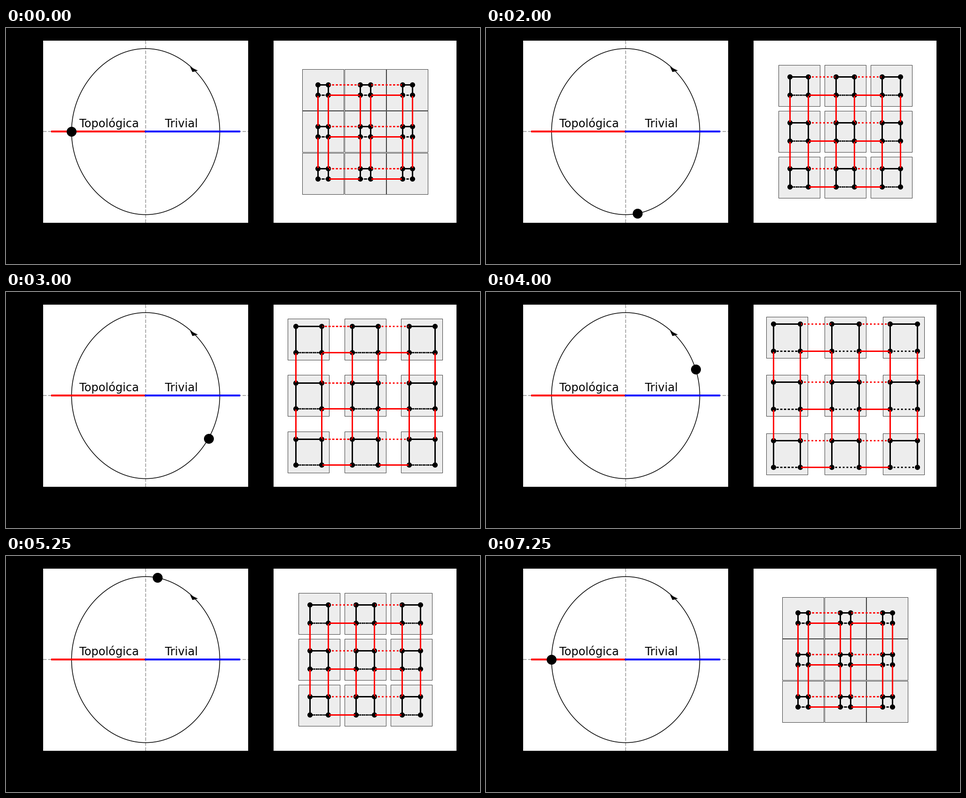
Animation, 1008 px wide and 504 px high, one loop 7.5 s. Source, as a matplotlib script:

```python
import numpy as np
import matplotlib.pyplot as plt
from matplotlib.animation import FuncAnimation
from matplotlib.patches import Polygon, Rectangle

W, H, DPI = 1008, 504, 72
FRAMES, INTERVAL = 30, 250
CX, CY = 297, 221.3            # centre of the parameter loop
RX, RY = 157.6, 177.3
LX, LY = 763.8, 221.3          # centre of the lattice
CELL = 88

plt.rcParams["font.family"] = "DejaVu Sans"
fig = plt.figure(figsize=(W / DPI, H / DPI), dpi=DPI, facecolor="black")
ax = fig.add_axes([0, 0, 1, 1])
ax.set(xlim=(0, W), ylim=(H, 0))
ax.axis("off")


def loop_point(angle):
    """Point of the slightly pinched oval, starting at its left end."""
    c = np.cos(angle)
    return CX - RX * c * (0.96 + 0.04 * c * c), CY + RY * np.sin(angle)


def lattice(angle):
    """Cell pitch and distance between the sites of one cell."""
    c = -np.cos(angle)
    pitch = 94.5 + 18.5 * c + 13.6 * c * c
    gap = 35.9 + 18.7 * c + 4.5 * c * c
    return pitch, gap


def bonds(pitch, gap):
    """Yield (color, style, start, end) for every bond."""
    h = gap / 2
    steps = (-1, 0, 1)
    for j in steps:
        for i in steps:
            x, y = LX + i * pitch, LY + j * pitch
            left, right, top, bottom = x - h, x + h, y - h, y + h
            next_x, next_y = left + pitch, top + pitch
            yield "black", "-", (left, top), (right, top)
            yield "black", ":", (left, bottom), (right, bottom)
            yield "black", "-", (left, top), (left, bottom)
            yield "black", "-", (right, top), (right, bottom)
            if i < 1:
                yield "red", ":", (right, top), (next_x, top)
                yield "red", "-", (right, bottom), (next_x, bottom)
            if j < 1:
                yield "red", "-", (left, bottom), (left, next_y)
                yield "red", "-", (right, bottom), (right, next_y)


# Left panel
for x, width in ((79, 436), (569, 389)):
    ax.add_patch(Rectangle((x, 27), width, 389, fc="white", ec="none", zorder=0))
for xs, ys in (((79, 515), (CY, CY)), ((CX, CX), (416, 27))):
    ax.plot(xs, ys, "--", color="0.68", lw=2, zorder=1)
ax.plot(*loop_point(np.linspace(0, 2 * np.pi, 400)), color="black", lw=1.5, zorder=2)
ax.add_patch(Polygon([(391.5, 83), (408, 91), (396.5, 94)], fc="black", ec="none", zorder=2))
ax.plot((98, CX), (CY, CY), color="red", lw=4, zorder=3)
ax.plot((CX, 496), (CY, CY), color="blue", lw=4, zorder=3)
ax.text(156, 212, "Topológica", fontsize=24, va="baseline", zorder=4)
ax.text(338, 212, "Trivial", fontsize=24, va="baseline", zorder=4)
dot, = ax.plot([], [], "o", color="black", ms=20, zorder=5)

# Right panel
cells = [ax.add_patch(Rectangle((0, 0), CELL, CELL, fc="#ededed", ec="0.25", lw=1, zorder=1))
         for _ in range(9)]
sites, = ax.plot([], [], "o", color="black", ms=10, zorder=2)
# Each bond is drawn in both directions, so dotted ones interleave.
bond_lines = [[ax.plot([], [], ls=style, color=color, lw=3,
                       zorder=3 if color == "red" else 4)[0] for _ in range(2)]
              for color, style, _, _ in bonds(*lattice(0))]


def update(frame):
    angle = 2 * np.pi * frame / (FRAMES - 1)
    x, y = loop_point(angle)
    dot.set_data([x], [y])

    pitch, gap = lattice(angle)
    for k, cell in enumerate(cells):
        cell.set_xy((LX + (k % 3 - 1) * pitch - CELL / 2,
                     LY + (k // 3 - 1) * pitch - CELL / 2))
    offsets = np.array([i * pitch + s * gap / 2 for i in (-1, 0, 1) for s in (-1, 1)])
    sx, sy = np.meshgrid(LX + offsets, LY + offsets)
    sites.set_data(sx.ravel(), sy.ravel())

    for (there, back), (_, _, start, end) in zip(bond_lines, bonds(pitch, gap)):
        xs, ys = zip(start, end)
        there.set_data(xs, ys)
        back.set_data(xs[::-1], ys[::-1])
    return [dot, sites]


anim = FuncAnimation(fig, update, frames=FRAMES, interval=INTERVAL,
                     repeat=True, repeat_delay=0)
plt.show()
```
